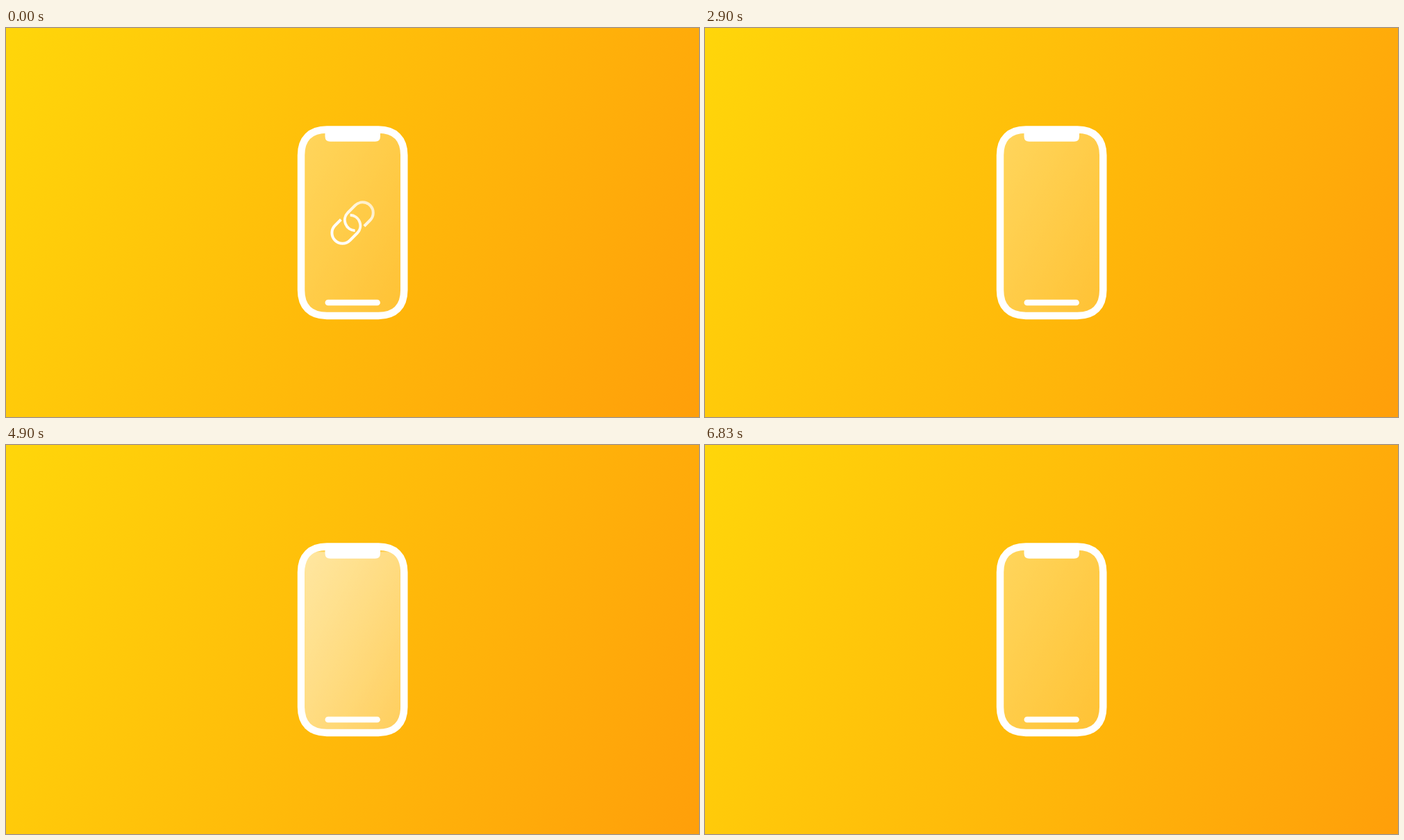
These frames come from a looping animation (998x561 px, 8 s). An HTML page:

```html
<!DOCTYPE html>
<html lang="en">
<head>
<meta charset="utf-8">
<title>Phone and link</title>
<style>
  html, body { margin: 0; width: 100%; height: 100%; overflow: hidden; }
  body { background: linear-gradient(116deg, #ffd60a, #ff9f0a); }
  svg { display: block; width: 100%; height: 100%; }
</style>
</head>
<body>
<svg viewBox="0 0 998 561">
  <defs>
    <path id="body" d="M462 146.5H536.3C560 146.5 573.3 159.8 573.3 183.5V378C573.3 401.7 560 415 536.3 415H462C438.3 415 425 401.7 425 378V183.5C425 159.8 438.3 146.5 462 146.5Z"/>
    <clipPath id="screen"><use href="#body"/></clipPath>
    <linearGradient id="glass" x2="1" y2="1">
      <stop stop-color="#fff" stop-opacity=".34"/>
      <stop offset="1" stop-color="#fff" stop-opacity=".17"/>
    </linearGradient>
    <linearGradient id="sheet" x2="1" y2="1">
      <stop stop-color="#fff" stop-opacity=".42"/>
      <stop offset="1" stop-color="#fff" stop-opacity=".2"/>
    </linearGradient>
    <linearGradient id="shine" gradientUnits="userSpaceOnUse" x1="-37" x2="37">
      <stop stop-color="#fff"/>
      <stop offset=".4" stop-color="#fff" stop-opacity=".95"/>
      <stop offset="1" stop-color="#fff" stop-opacity=".7"/>
    </linearGradient>
  </defs>

  <use href="#body" fill="url(#glass)"/>
  <g clip-path="url(#screen)">
    <rect id="card" rx="9" fill="url(#sheet)"/>
    <g id="link" fill="none" stroke="url(#shine)" stroke-width="4">
      <path d="M8.5 15.2H20.5A15.2 15.2 0 0 0 20.5 -15.2H5.7A15.2 15.2 0 0 0 -5.4 10.4"/>
      <path d="M-8.5 -15.2H-20.5A15.2 15.2 0 0 0 -20.5 15.2H-5.7A15.2 15.2 0 0 0 5.4 -10.4"/>
    </g>
  </g>
  <use href="#body" fill="none" stroke="#fff" stroke-width="10.5"/>
  <path fill="#fff" d="M459.5 147H539V156.5Q539 163.8 531.7 163.8H466.8Q459.5 163.8 459.5 156.5Z"/>
  <rect x="459.5" y="391.7" width="79.4" height="8.5" rx="4.25" fill="#fff"/>
</svg>
<script>
const LOOP = 8000;
const card = document.getElementById('card');
const link = document.getElementById('link');

const progress = (t, start, length) => Math.min(1, Math.max(0, (t - start) / length));
const ease = p => (1 - Math.cos(Math.PI * p)) / 2;

function drawLink(t) {
  const pulse = Math.sin(Math.PI * progress(t, 1040, 460)) ** 2;
  const drop = 175 * ease(progress(t, 2505, 450));
  link.setAttribute('transform',
    `translate(499.1 ${281 + drop}) rotate(-45) scale(${1 + 0.2 * pulse})`);
  link.style.display = t < 2955 ? '' : 'none';
}

// The card grows from below the screen until it fills it, then shrinks back.
function drawCard(t) {
  const size = ease(progress(t, 3963, 1000)) - ease(progress(t, 6010, 1050));
  const width = 138.4 * size;
  const attrs = {
    x: 499.2 - width / 2,
    y: 151.5 + 298 * (1 - size),
    width,
    height: 258.5 * size
  };
  for (const name in attrs) card.setAttribute(name, attrs[name]);
}

const begin = performance.now();
function tick() {
  const t = (performance.now() - begin) % LOOP;
  drawLink(t);
  drawCard(t);
  requestAnimationFrame(tick);
}
tick();
</script>
</body>
</html>
```
